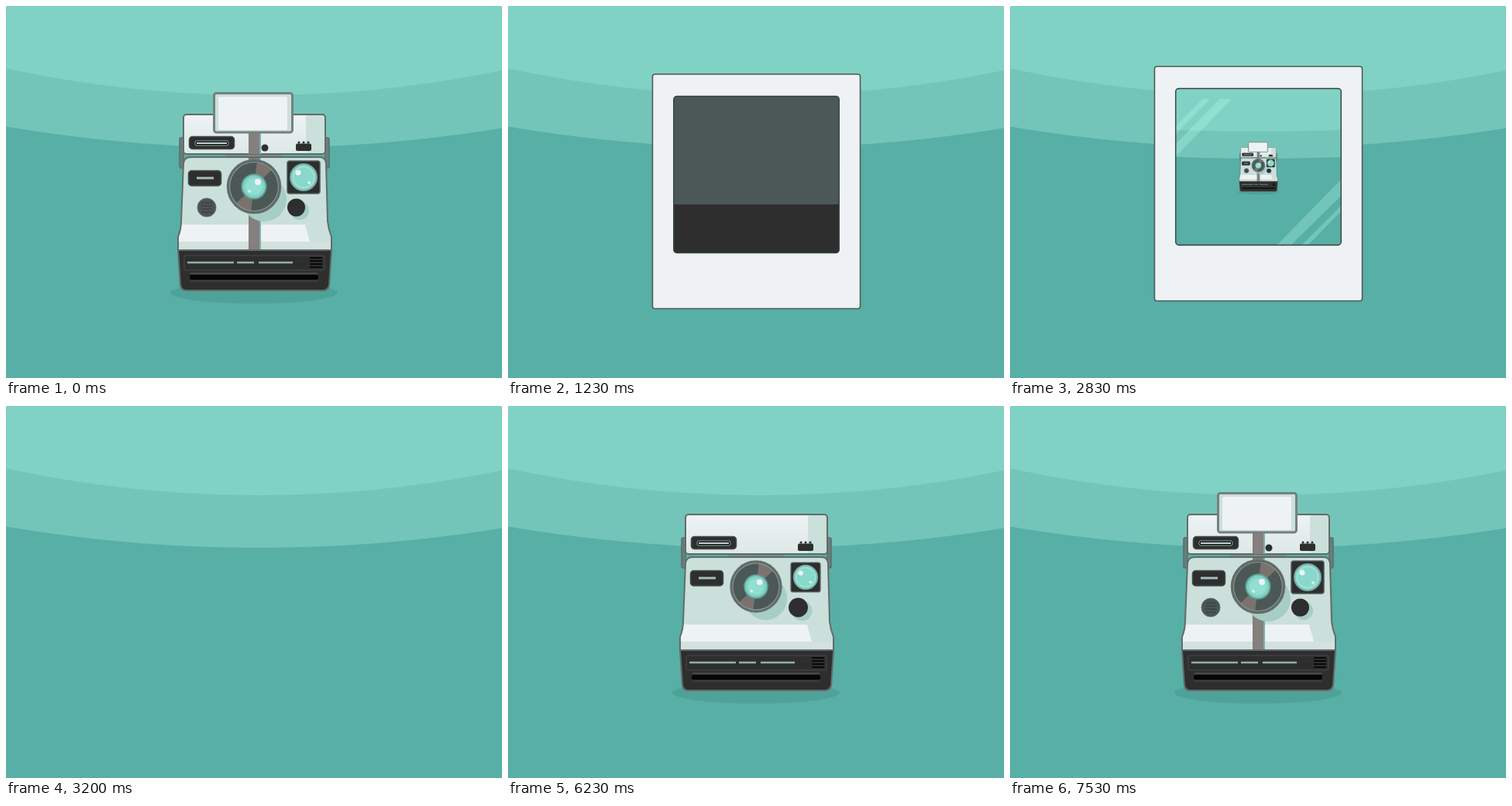
An HTML page with a canvas for the animation above (7560 ms loop, 640 by 480 pixels).

```html
<!DOCTYPE html>
<html lang="en">
<head>
<meta charset="utf-8">
<title>Instant camera</title>
<style>
html, body { margin: 0; width: 100%; height: 100%; overflow: hidden; background: #57afa6; }
canvas { display: block; width: 100vw; height: 100vh; }
</style>
</head>
<body>
<canvas id="stage" width="640" height="480"></canvas>
<script>
const g = document.getElementById('stage').getContext('2d');
const LOOP = 7560, DONE = 1e6;
const WHITE = '#eef2f4', PALE = '#cbdfdb', DARK = '#2e2e2e', EDGE = '#626b69';
const TEAL = '#7fd3c5', SHADE = '#a6cdc6', METAL = '#857f7d';
const BANDS = ['#80d3c4', '#74c5b9', '#57afa6'];

const clamp = v => Math.max(0, Math.min(1, v));
const span = (t, a, b) => clamp((t - a) / (b - a));
const mix = (a, b, p) => a + (b - a) * p;
const easeOut = p => 1 - (1 - p) ** 3;
const easeInOut = p => p < .5 ? 4 * p ** 3 : 1 - (2 - 2 * p) ** 3 / 2;
const backOut = (p, c = 1.7) => 1 + (c + 1) * (p - 1) ** 3 + c * (p - 1) ** 2;

function paint(fill, stroke, width = 2) {
  if (fill) { g.fillStyle = fill; g.fill(); }
  if (stroke) { g.strokeStyle = stroke; g.lineWidth = width; g.stroke(); }
}
function box(x1, y1, x2, y2, r, fill, stroke, width) {
  g.beginPath();
  g.roundRect(x1, y1, x2 - x1, y2 - y1, r);
  paint(fill, stroke, width);
}
function oval(x, y, rx, ry, fill, stroke, width) {
  g.beginPath();
  g.ellipse(x, y, rx, ry, 0, 0, 7);
  paint(fill, stroke, width);
}
const disc = (x, y, r, fill, stroke, width) => oval(x, y, r, r, fill, stroke, width);
function line(x1, x2, y, width, color) {
  g.beginPath();
  g.moveTo(x1, y);
  g.lineTo(x2, y);
  paint(null, color, width);
}
function poly(fill, ...pts) {
  g.beginPath();
  for (let i = 0; i < pts.length; i += 2) g.lineTo(pts[i], pts[i + 1]);
  g.closePath();
  paint(fill);
}
// Draws a part scaled by sx, sy about a pivot.
function scaled(x, y, sx, sy, draw) {
  if (sx <= 0 || sy <= 0) return;
  g.save();
  g.translate(x, y);
  g.scale(sx, sy);
  g.translate(-x, -y);
  draw();
  g.restore();
}
function pop(t, start, length, x, y, draw, size = 1) {
  if (t <= start) return;
  const s = backOut(span(t, start, start + length)) * size;
  scaled(x, y, s, s, draw);
}

function backdrop() {
  g.fillStyle = BANDS[2];
  g.fillRect(0, 0, 640, 480);
  oval(326, -1017, 1530, 1200, BANDS[1]);
  oval(326, -885, 1250, 1000, BANDS[0]);
}

function bodyPath() {
  g.beginPath();
  g.moveTo(222, 315);
  g.lineTo(222, 298);
  g.quadraticCurveTo(226, 288, 226, 278);
  g.lineTo(229, 203);
  g.quadraticCurveTo(230, 195, 238, 195);
  g.lineTo(405, 195);
  g.quadraticCurveTo(412, 195, 413, 203);
  g.lineTo(415, 278);
  g.quadraticCurveTo(416, 288, 420, 298);
  g.lineTo(420, 315);
  g.closePath();
}
function body() {
  bodyPath();
  g.save();
  g.clip();
  paint(PALE);
  poly(WHITE, 226, 282, 386, 282, 392, 304, 220, 304);
  box(220, 304, 422, 316, 0, '#d3e2df');
  g.restore();
  bodyPath();
  paint(null, EDGE);
}
function base() {
  g.beginPath();
  g.moveTo(222, 315);
  g.lineTo(420, 315);
  g.lineTo(417, 360);
  g.quadraticCurveTo(416, 367, 409, 367);
  g.lineTo(232, 367);
  g.quadraticCurveTo(226, 367, 225, 360);
  g.closePath();
  paint(DARK, EDGE);
}
function head() {
  const fade = g.createLinearGradient(0, 140, 0, 191);
  fade.addColorStop(0, WHITE);
  fade.addColorStop(1, '#dce8e6');
  box(229, 140, 412, 191, 4, fade);
  box(387, 141, 411, 190, 3, PALE);
  box(229, 140, 412, 191, 4, null, EDGE);
}
function lens() {
  disc(320, 233, 34, '#4b5856', '#656e6c', 2.5);
  for (const a of [-1.1, 2.04]) {
    g.beginPath();
    g.moveTo(320, 233);
    g.arc(320, 233, 31, a - .35, a + .35);
    g.closePath();
    paint('#7b726e');
  }
  disc(320, 233, 31.5, null, '#8b9b98', 1.2);
  disc(320, 233, 15.5, TEAL, '#62a49c', 2);
  disc(320, 233, 11, '#91ded2');
  disc(325, 227, 4, WHITE);
  disc(314, 239, 2, '#d4f1ec');
}
function finder() {
  box(363, 200, 405, 242, 3, DARK, '#515b59', 1.5);
  disc(384, 221, 17, '#88d8cb', '#7ba9a3', 2);
  disc(384, 221, 13.5, null, '#a4e2d9', 1.5);
  disc(377, 215, 3.5, WHITE);
  disc(391, 228, 2, '#d4f1ec');
}
function flash() {
  box(268.5, 112.5, 369.5, 163, 3, PALE, '#75817e', 3);
  box(274, 117, 363, 160, 2, WHITE);
}

function camera(t) {
  const grow = span(t, 6230, 6400);
  const shadow = easeOut(span(t, 4330, 4600));
  scaled(320, 370, shadow, shadow, () => oval(320, 370, 108, 14, '#4fa29a'));

  const side = easeOut(span(t, 5500, 5700));
  if (side) for (const x of [mix(230, 224, side), mix(407, 412, side)])
    box(x, 170, x + 5, 209, 2, '#62817d', EDGE, 1.5);

  const neck = easeOut(span(t, 4640, 4720));
  scaled(320, 195, 1, neck, () => poly('#6f918d', 286, 190, 353, 190, 357, 196, 282, 196));
  const lift = easeOut(span(t, 4480, 4700));
  scaled(320, 315, 1, lift, body);
  const foot = easeOut(span(t, 4330, 4560));
  scaled(320, 367, foot, foot, base);
  const top = easeOut(span(t, 4680, 4880));
  scaled(320, 191, top, top, head);

  const slot = easeInOut(span(t, 4870, 5110));
  scaled(320, 350, slot, 1, () => {
    box(237, 347, 403, 353, 2, '#050505');
    line(238, 402, 345, 1, '#5f6765');
    line(238, 402, 355, 1, '#454b4a');
  });
  const trim = easeOut(span(t, 5080, 5320));
  scaled(230, 331, trim, 1, () => {
    box(230, 322, 411, 341, 2, null, '#444a48', 1);
    for (const [a, b] of [[234, 294], [298, 320], [326, 370]]) line(a, b, 331, 2.5, '#8fb0aa');
    for (let y = 325; y < 340; y += 4) line(392, 408, y, 2, '#090909');
  });
  pop(t, 5250, 240, 265, 176, () => {
    box(236.5, 168.5, 294.5, 184.5, 4, DARK, '#454e4c', 1.5);
    box(244, 174, 287, 180, 2, '#111', '#8fa6a2', 1);
    line(246, 285, 177, 2, '#c3d6d2');
  });
  pop(t, 5380, 240, 257, 222, () => {
    box(235.5, 212.5, 277.5, 232, 4, DARK, '#454e4c', 1.5);
    line(246, 268, 222, 3, '#a3bdb8');
  });
  pop(t, 5500, 220, 384, 182, () => {
    box(374, 177.5, 394, 187, 2, DARK);
    for (const x of [378, 384, 390]) disc(x, 176, 1.5, DARK);
  });

  const bar = easeInOut(span(t, 6240, 6460));
  if (bar) {
    g.save();
    g.beginPath();
    g.rect(300, mix(315, 140, bar), 60, 200);
    g.clip();
    for (const [a, b] of [[141, 191], [196, 314]]) {
      box(313, a, 327, b, 0, METAL);
      box(327, a, 329, b, 0, '#79b3ac');
      line(313, 327, a, 1, EDGE);
    }
    g.restore();
  }

  pop(t, 5650, 260, 320, 233, () => {
    disc(333, 249, 29, SHADE);
    lens();
  }, mix(.955, 1, grow));
  pop(t, 5850, 250, 384, 221, finder, mix(.9, 1, grow));
  pop(t, 6080, 220, 374.5, 260, () => {
    disc(379, 264, 12, SHADE);
    disc(374.5, 260, 11.5, DARK);
  });
  pop(t, 6260, 230, 259, 260, () => {
    disc(259, 260, 12, '#4b5553', '#66706e', 1);
    for (let i = -6; i <= 6; i += 4) line(252, 266, 260 + i, 1, '#343a39');
  });
  pop(t, 6340, 200, 334, 183, () => disc(334, 183, 4.5, DARK));
  if (t > 6330) scaled(319, 163, 1, backOut(span(t, 6330, 6600), 2.9), flash);
}

// The print, laid out at its resting place with centre (320.5, 239.5).
function print(x, y, size, dark) {
  g.save();
  g.translate(x, y);
  g.scale(size, size);
  g.translate(-320.5, -239.5);
  box(186.5, 88, 454.5, 390.5, 3, WHITE, '#4f5957', 1.6);

  g.save();
  g.beginPath();
  g.roundRect(213.8, 116.5, 213.4, 202, 4);
  g.clip();
  g.fillStyle = BANDS[2];
  g.fillRect(210, 110, 220, 212);
  oval(320, -93, 900, 300, BANDS[1]);
  oval(320, -128, 900, 300, BANDS[0]);
  g.save();
  g.translate(320.5, 217.5);
  g.scale(.25, .25);
  g.translate(-320.5, -239.5);
  camera(DONE);
  g.restore();

  const glare = 'rgba(185,255,235,.28)';
  poly(glare, 271, 130, 286, 130, 213, 205, 213, 189);
  poly(glare, 249, 130, 258, 130, 213, 176, 213, 166);
  poly(glare, 428, 233, 428, 254, 362, 319, 344, 319);
  poly(glare, 428, 267, 428, 274, 384, 319, 376, 319);
  if (dark) {
    g.globalAlpha = dark;
    box(210, 110, 430, 258, 0, '#4b5856');
    box(210, 256, 430, 322, 0, DARK);
    g.globalAlpha = 1;
  }
  g.restore();
  box(213.8, 116.5, 427.2, 318.5, 4, null, '#35403e', 1.4);
  g.restore();
}

function ejecting(t, rise) {
  const out = easeInOut(span(t, 260, 780));
  if (!out) return;
  const lip = 350 - rise;
  g.save();
  g.beginPath();
  g.rect(0, lip, 640, 480);
  g.clip();
  print(320.5, mix(lip - 92, 368, out), .6, 1);
  g.restore();
}

function moving(t) {
  const come = easeInOut(span(t, 800, 1220));
  const zoom = easeInOut(span(t, 1540, 2120)) - easeInOut(span(t, 2330, 2780));
  const leave = span(t, 2740, 3160) ** 2.4;
  const dip = 40 * Math.sin(Math.PI * span(t, 800, 1100));
  const size = mix(.6, 1, come) + 1.28 * zoom;
  const y = mix(368, 239.5, come) + dip + 9.5 * zoom - 395 * leave;
  print(320.5, y, size, 1 - easeInOut(span(t, 1330, 2080)));
}

function draw(t) {
  backdrop();
  if (t < 1500) {
    const rise = 80 * (easeInOut(span(t, 20, 420)) - easeInOut(span(t, 830, 1190)));
    g.save();
    g.translate(0, -rise);
    camera(DONE);
    g.restore();
    if (t < 800) ejecting(t, rise);
  }
  if (t >= 800 && t < 3180) moving(t);
  if (t >= 4330) camera(t);
}

const begin = performance.now();
function tick() {
  draw((performance.now() - begin) % LOOP);
  requestAnimationFrame(tick);
}
tick();
</script>
</body>
</html>
```
